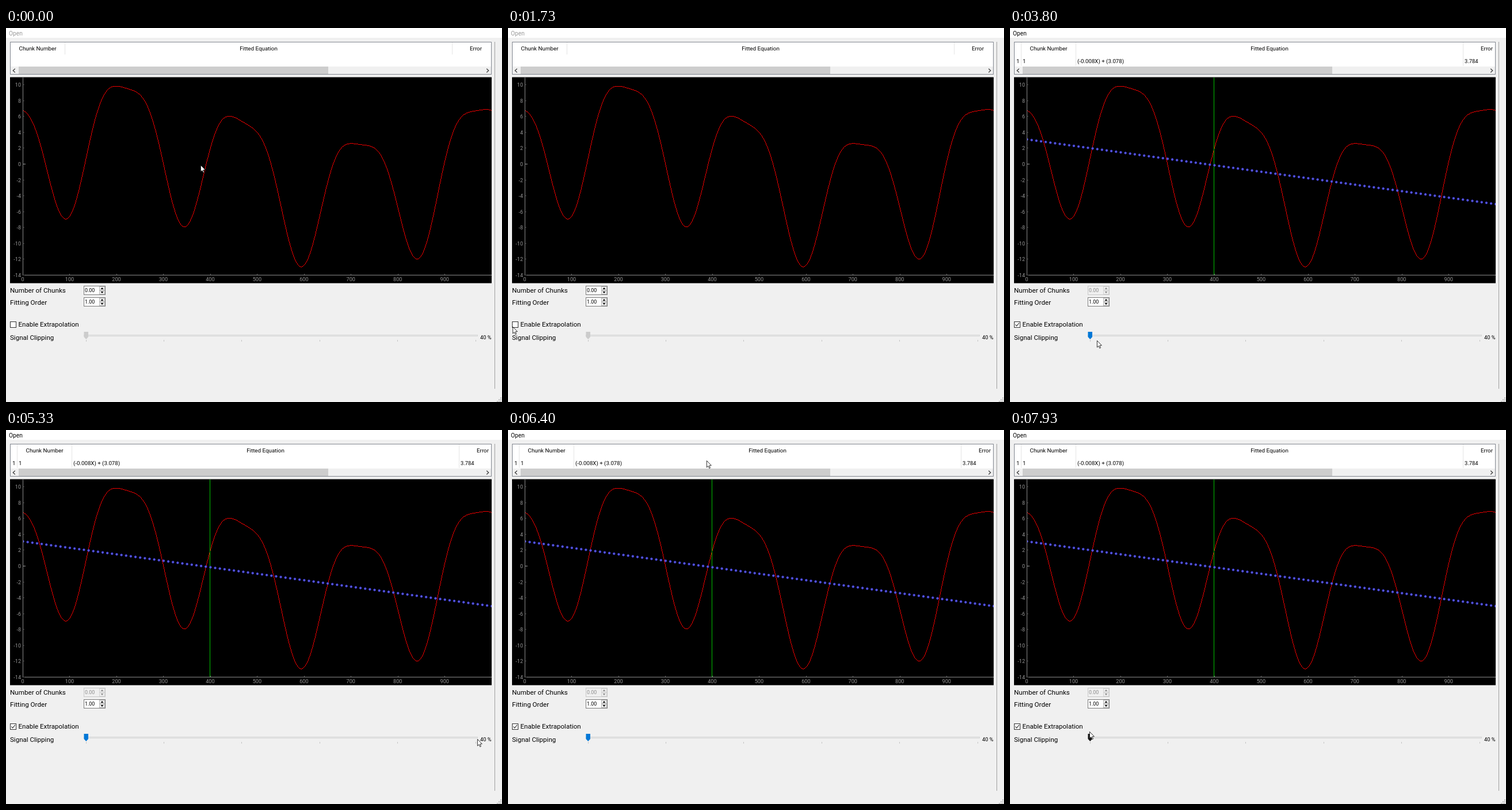
An HTML page with a canvas for the animation above (8 s loop, 862x650 px).

```html
<!DOCTYPE html>
<html lang="en">
<head>
<meta charset="utf-8">
<title>Signal fitting</title>
<style>
html, body { margin: 0; width: 100%; height: 100%; overflow: hidden; background: #f0f0f0; }
canvas { display: block; }
</style>
</head>
<body>
<canvas id="stage" width="862" height="650"></canvas>
<script>
const ctx = document.getElementById('stage').getContext('2d');
const LOOP = 8000, STEP = 200 / 3;
const ACTIVE_AT = 2590, FIT_AT = 2730;

// Pointer stops: arrival time, x, y
const stops = [
  [0, 338, 238], [1400, 46, 518], [1730, 8, 519], [2200, 10, 513],
  [3800, 151, 543], [4270, 138, 539], [4800, 138, 539], [5000, 504, 543],
  [5330, 819, 537], [6000, 420, 197], [6400, 345, 53], [6730, 353, 262],
  [7200, 250, 578], [7670, 136, 551], [7930, 138, 524]
];

const px = s => 29.5 + s * 0.8147;
const py = v => 236 - v * 13.77;

function signal(s) {
  const slow = 2 * Math.PI * s / 1000, fast = 4 * slow;
  return 1.4 * Math.cos(slow) + 3.35 * Math.sin(slow)
    + 5.3 * Math.cos(fast) - 6 * Math.sin(fast) + 2 * Math.sin(2 * fast);
}

// Waits at a stop, then eases to the next; longer ways take more time.
function pointerAt(t) {
  const i = stops.findIndex(stop => stop[0] > t);
  if (i < 0) return stops[stops.length - 1].slice(1);
  const [t0, x0, y0] = stops[i - 1], [t1, x1, y1] = stops[i];
  const span = Math.min(t1 - t0, 150 + 1.7 * Math.hypot(x1 - x0, y1 - y0));
  const k = Math.max(0, 1 - (t1 - t) / span), ease = k * k * (3 - 2 * k);
  return [Math.round(x0 + (x1 - x0) * ease), Math.round(y0 + (y1 - y0) * ease)];
}

function box(x, y, w, h, fill, border) {
  ctx.fillStyle = fill;
  ctx.fillRect(x, y, w, h);
  if (!border) return;
  ctx.strokeStyle = border;
  ctx.lineWidth = 1;
  ctx.strokeRect(x + 0.5, y + 0.5, w - 1, h - 1);
}

function text(str, x, y, size, color = '#000', align = 'left') {
  ctx.font = size + 'px Roboto, "Open Sans", sans-serif';
  ctx.fillStyle = color;
  ctx.textAlign = align;
  ctx.fillText(str, x, y);
}

function line(points, color, width = 1) {
  ctx.beginPath();
  points.forEach(([x, y]) => ctx.lineTo(x, y));
  ctx.strokeStyle = color;
  ctx.lineWidth = width;
  ctx.stroke();
}

function shape(points, fill) {
  ctx.beginPath();
  points.forEach(([x, y]) => ctx.lineTo(x, y));
  ctx.closePath();
  ctx.fillStyle = fill;
  ctx.fill();
}

function chevron(x, y, dir) {
  line([[x - dir * 1.75, y - 3.3], [x + dir * 1.75, y], [x - dir * 1.75, y + 3.3]], '#404040', 1.3);
}

function drawTable(fitted) {
  box(7, 24, 837, 57, '#fff', '#828790');
  const shift = fitted ? 12 : 0;
  text('Chunk Number', 55 + shift, 39, 9.8, '#000', 'center');
  text('Fitted Equation', 439 + shift, 39, 9.8, '#000', 'center');
  text('Error', 816.5 + shift, 39, 9.8, '#000', 'center');
  const rule = fitted ? 41 : 21;
  for (const x of [102, 775]) box(x + shift, 25, 1, rule, '#e5e5e5');
  if (fitted) {
    box(19, 25, 1, rule, '#e5e5e5');
    text('1', 11, 61, 9.7);
    text('1', 22, 61, 9.7);
    text('(-0.008X) + (3.078)', 117, 61, 9.7);
    text('3.784', 790, 61, 9.4);
  }
  box(8, 67, 835, 13, '#f0f0f0');
  box(22, 67, 538, 13, '#cdcdcd');
  chevron(14, 74, -1);
  chevron(837, 74, 1);
}

// One-pixel line without smoothing, column by column
function drawSignal() {
  ctx.fillStyle = '#e80000';
  for (let x = 30; x < 844; x++) {
    const [a, b] = [x, x + 1].map(p => Math.floor(py(signal((p - 29.5) / 0.8147))));
    ctx.fillRect(x, Math.min(a, b), 1, Math.max(1, Math.abs(a - b)));
  }
}

function drawFit() {
  box(354, 86, 1, 344, '#00c000');
  ctx.strokeStyle = '#3a3ae6';
  ctx.fillStyle = '#6464c8';
  ctx.lineWidth = 1;
  for (let s = 0; s <= 1000; s += 10) {
    ctx.beginPath();
    ctx.arc(px(s), py(3.078 - 0.00817 * s), 1.8, 0, 7);
    ctx.fill();
    ctx.stroke();
  }
}

function drawPlot(fitted) {
  box(7, 85.5, 837, 358, '#000');
  ctx.save();
  ctx.beginPath();
  ctx.rect(29, 86, 815, 344);
  ctx.clip();
  drawSignal();
  if (fitted) drawFit();
  ctx.restore();
  box(29, 86, 1, 344, '#8a8a8a');
  box(29, 429, 815, 1, '#8a8a8a');
  for (let v = 10; v >= -14; v -= 2) {
    text(String(v), 26, Math.round(py(v)) + 4, 9.1, '#969696', 'right');
    box(30, Math.round(py(v)), v ? 2 : 4, 1, v ? '#404040' : '#969696');
  }
  for (let s = 0; s < 1000; s += 100) {
    text(String(s), px(s) - 0.5, 440, 9.1, '#969696', 'center');
    if (s) box(Math.floor(px(s)), 427, 1, 2, '#606060');
  }
}

function drawSpin(y, value, enabled) {
  const ink = enabled ? '#000' : '#8c8c8c';
  box(135, y, 38, 16, enabled ? '#fff' : '#f0f0f0', enabled ? '#7a7a7a' : '#c8c8c8');
  text(value, 137, y + 11, 8.9, ink);
  for (const dir of [-1, 1]) {
    const mid = y + 8 + dir * 3.5;
    box(162, mid - 3.5, 10, 7, '#f0f0f0', enabled ? '#b8b8b8' : '#d4d4d4');
    shape([[164.5, mid - dir * 1.5], [167, mid + dir * 1.5], [169.5, mid - dir * 1.5]], ink);
  }
}

function drawControls(fitted, [mx, my]) {
  const over = (x, y, w, h) => mx >= x && mx < x + w && my >= y && my < y + h;
  text('Number of Chunks', 7, 460, 11.65);
  text('Fitting Order', 7, 481, 11.65);
  drawSpin(448, '0.00', !fitted);
  drawSpin(468, '1.00', true);

  const ink = over(7, 509, 121, 10) ? '#0078d7' : '#333';
  box(7, 510, 11, 11, '#fff', ink);
  if (fitted) line([[9.3, 515.3], [11.6, 517.8], [15.8, 512.6]], ink, 1.1);
  text('Enable Extrapolation', 21.5, 519, 11.55);

  text('Signal Clipping', 7, 542, 11.55);
  box(135, 533, 685, 3, '#e7eaea', '#d6d6d6');
  for (let i = 0; i < 6; i++) box(Math.floor(139 + i * 135.4), 542, 1, 3, '#c4c4c4');
  const color = !fitted ? '#cccccc' : over(134, 522, 10, 21) ? '#171717' : '#0078d7';
  shape([[135.5, 528], [143, 528], [143, 537], [139.25, 541], [135.5, 537]], color);
  text('40 %', 824, 541, 9.4);
}

function drawPointer([x, y]) {
  const outline = [[0, 0], [0, 11.6], [2.6, 9.2], [4.4, 13.2], [6.1, 12.4],
    [4.4, 8.5], [7.9, 8.2], [0, 0]].map(([a, b]) => [x + 0.4 + a, y + 0.4 + b]);
  shape(outline, '#fff');
  line(outline, '#000', 0.8);
}

function draw(t) {
  const fitted = t >= FIT_AT, mouse = pointerAt(t);
  box(0, 0, 862, 650, '#f0f0f0');
  box(0, 0, 862, 17, '#fff');
  text('Open', 5, 13, 10.2, t >= ACTIVE_AT ? '#000' : '#999');
  drawTable(fitted);
  drawPlot(fitted);
  drawControls(fitted, mouse);
  box(849, 24, 1, 603, '#a0a0a0');
  for (let r = 0; r < 3; r++)
    for (let c = 0; c <= r; c++) box(859 - c * 3, 642 + r * 3, 2, 2, '#bfbfbf');
  drawPointer(mouse);
}

const start = performance.now();
function tick() {
  const t = (performance.now() - start) % LOOP;
  draw(Math.floor((t + 4) / STEP) * STEP);
  requestAnimationFrame(tick);
}
tick();
</script>
</body>
</html>
```
